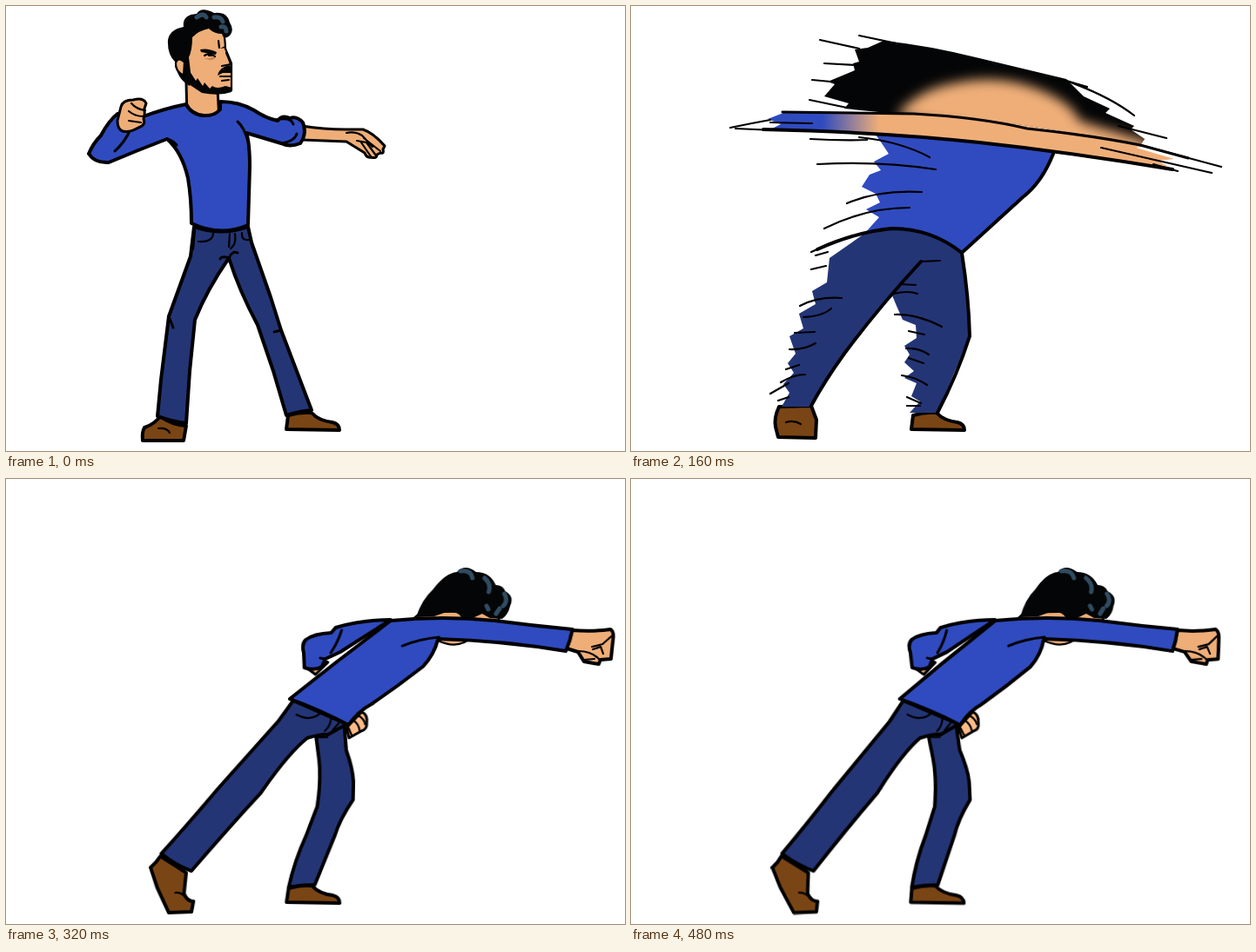
An HTML page that plays this animation: 711x512 px, repeating every 0.56 s.

```html
<!DOCTYPE html>
<html lang="en">
<head>
<meta charset="utf-8">
<title>Punch</title>
<style>
  html, body { margin: 0; width: 100%; height: 100%; overflow: hidden; background: #fff; }
  svg { display: block; width: 100vw; height: 100vh; }
  path { stroke: #000; stroke-width: 4; stroke-linejoin: round; stroke-linecap: round; fill: none; }
  .shirt { fill: #304bbf; }
  .jean { fill: #243576; }
  .skin { fill: #efae78; }
  .palm { fill: #fdbc87; }
  .shoe { fill: #7a4514; }
  .hair { fill: #040506; }
  .shade { fill: #c98652; }
  .sleeve { fill: url(#sleeve); }
  .shine { stroke: #2f4b61; stroke-width: 5; }
  .thin { stroke-width: 2.2; }
  .mid { stroke-width: 3; }
  .bare { stroke: none; }

  /* Poses lean by skewing about the ground line. */
  .pose { transform-origin: 0 500px; animation: .56s step-end infinite; }
  #windup { animation-name: windup; }
  #swing { animation-name: swing; }
  #punch { animation-name: punch; }
  @keyframes windup {
    0% { visibility: visible; transform: none; }
    14.2857% { visibility: visible; transform: skewX(1.75deg); }
    28.5714%, 100% { visibility: hidden; transform: none; }
  }
  @keyframes swing {
    0% { visibility: hidden; }
    28.5714% { visibility: visible; }
    42.8571%, 100% { visibility: hidden; }
  }
  @keyframes punch {
    0% { visibility: hidden; transform: none; }
    42.8571% { visibility: visible; transform: none; }
    57.1428% { visibility: visible; transform: skewX(-1.15deg); }
    71.4286% { visibility: visible; transform: skewX(1.66deg); }
    85.7143%, 100% { visibility: visible; transform: skewX(2.86deg); }
  }
</style>
</head>
<body>
<svg viewBox="0 0 711 512">
  <defs>
    <path id="shoe" class="shoe" d="M324 471L322 487L383 488Q383 481 375 479Q359 477 351 468Q338 467 324 471Z"/>
    <path id="mane" class="hair bare" d="M290 40Q340 45 400 60L500 84L520 104L550 118L545 123L578 138L574 142L590 153L585 160Q490 142 400 130L325 126L245 118L250 112L222 104L234 90L226 87L257 74L255 66L262 64L257 50L272 48Z"/>
    <clipPath id="maneClip"><use href="#mane"/></clipPath>
    <filter id="soft" x="-20%" y="-40%" width="140%" height="180%"><feGaussianBlur stdDeviation="7"/></filter>
    <linearGradient id="sleeve" gradientUnits="userSpaceOnUse" x1="220" y1="0" x2="285" y2="0">
      <stop stop-color="#304bbf"/><stop offset="1" stop-color="#efae78"/>
    </linearGradient>
  </defs>

  <g id="windup" class="pose">
    <!-- legs -->
    <path class="shoe" d="M177 472Q171 481 159 485Q156 490 157 500L204 500L207 483Q190 482 177 472Z"/>
    <path class="thin" d="M175 486Q185 485 188 491"/>
    <use href="#shoe"/>
    <path class="jean" d="M216 254Q245 265 278 254L282 272L304 335L316 373L351 465Q338 466 322 471L307 420L289 367Q268 328 256 290Q231 326 217 361L211 420L207 480Q193 479 174 472L178 430L187 357L212 288Z"/>
    <path class="mid" d="M187 357L192 370M316 373L308 375M256 290Q260 281 266 284M256 290Q248 287 246 291"/>
    <path class="thin" d="M238 261Q238 272 221 271M257 262L256 277M263 262Q265 274 258 279M271 261Q270 270 279 269M217 258L215 280"/>
    <!-- arms and torso -->
    <path class="skin mid" d="M207 88L208 132L245 132L243 95Z"/>
    <path class="skin mid" d="M340 138Q365 142 390 142L410 142Q422 146 435 161L433 165Q435 170 430 169L426 171Q426 176 419 174Q414 175 412 169L391 156L340 154Z"/>
    <path class="thin" d="M391 146Q401 144 409 149L421 162M411 152L430 167M403 155L414 157L425 172M408 157L419 173"/>
    <path class="shirt" d="M207 113Q182 118 158 127L128 124Q118 132 109 149Q100 158 95 170Q102 181 118 180Q151 166 185 153Q202 168 209 198Q213 222 213 250Q246 266 278 252Q279 215 280 185Q280 158 276 146L316 158Q326 163 338 158Q346 147 341 134Q334 126 326 129Q317 125 312 132Q298 129 285 120Q268 110 246 110L246 119Q239 127 227 126Q213 125 207 113Z"/>
    <path class="mid" d="M266 133Q274 140 278 156M185 153Q191 154 196 160M142 144Q136 157 125 167M310 131Q327 127 330 136M317 158Q332 155 334 147"/>
    <path class="skin mid" d="M132 116Q134 108 146 108Q158 105 161 112L159 118Q160 124 158 130Q161 137 152 140Q142 146 134 144Q128 142 128 132Z"/>
    <path class="thin" d="M144 112Q150 119 160 120M141 121Q148 127 158 127M141 132L155 134"/>
    <!-- head -->
    <path class="skin thin" d="M207 24L249 24Q252 40 252 49L259 66L259 97Q245 102 230 98L212 86L205 60Z"/>
    <path class="hair bare" d="M211 92Q196 84 194 64Q185 55 186 39Q188 27 204 24Q202 10 219 9Q224 0 239 8Q254 6 257 19Q263 28 256 35Q250 39 248 32Q239 32 233 26Q222 28 214 36Q214 51 210 59L212 76Z"/>
    <path class="shine" d="M219 13Q227 7 230 13M239 13Q247 12 249 18M247 24Q253 23 253 29"/>
    <path class="hair bare" d="M207 74L210 90L225 100Q245 104 259 99L260 94L252 92Q242 96 237 92L234 95L228 88L226 92L220 83L218 86L211 75Z"/>
    <path class="skin thin" d="M205 65Q198 58 195 65Q194 75 204 80Z"/>
    <path class="hair bare" d="M243 80Q245 70 257 68L260 72L259 77L249 77ZM223 50Q232 48 242 53L241 56L224 53ZM246 49L253 45L253 48Z"/>
    <path class="shade bare" d="M226 59Q234 65 241 60L238 58Q232 62 226 59Z"/>
    <path class="thin" d="M228 57Q234 53 240 58M233 57L236 57M244 40L245 48M253 54Q257 63 258 67L248 69M246 81L258 81M248 86L256 85"/>
  </g>

  <g id="swing" class="pose">
    <path class="shoe" d="M170 461Q164 474 166 484L169 496L212 497L213 476L207 460Z"/>
    <path class="thin" d="M178 479Q187 476 195 481"/>
    <use href="#shoe"/>
    <path class="jean bare" d="M268 262Q300 252 335 260Q360 268 381 285L388 340L389 380L352 468L320 468L332 455L322 449L328 434L314 428L325 420L314 410L320 401L314 391L328 382L327 367L312 361L305 345L300 333Q270 367 245 400L207 461L173 461L182 445L175 435L187 422L180 411L189 400L182 380L198 371L193 354L212 343L208 328L225 318L228 290Z"/>
    <path class="shirt bare" d="M272 135L485 164Q473 203 450 220L382 284Q350 259 310 256Q290 255 268 262L285 243L270 234L286 226L281 216L265 208L274 194L287 189L279 179L296 170L288 158Z"/>
    <path d="M214 280Q258 260 300 256Q345 256 380 284M485 170Q472 203 450 220L381 283M380 284Q388 335 389 380Q375 424 352 468M333 294Q286 345 245 400Q222 432 207 460"/>
    <path class="thin" d="M333 294L355 293"/>
    <!-- blurred head and arm -->
    <use href="#mane"/>
    <g clip-path="url(#maneClip)">
      <path class="skin bare" filter="url(#soft)" d="M305 126Q330 95 375 88Q430 77 480 101Q508 114 515 132L600 158L580 175Z"/>
    </g>
    <path class="sleeve bare" d="M157 130L180 121L325 124Q405 128 500 146Q555 153 590 161L580 163L624 176L605 178L624 189Q490 169 400 157Q290 145 160 142L172 136Z"/>
    <path class="mid" d="M174 122L325 124Q400 128 455 141Q530 149 585 160L640 175"/>
    <path d="M152 142Q290 145 400 157Q510 169 622 188"/>
    <!-- speed lines -->
    <path class="thin" d="M262 34L305 43M217 39L262 49M222 66L260 68M208 85L240 88M205 108L248 117M490 83L524 93M500 86Q550 104 578 126M560 138L615 152M585 160L678 185M540 163L667 192M600 182L628 190M114 140Q138 135 160 131M120 141L165 143M160 134L208 135"/>
    <path class="thin" d="M206 153Q240 155 271 154M262 151Q310 156 343 174M214 182Q285 178 350 188M248 227Q285 211 334 214M222 256Q270 232 320 232M207 283L232 272M212 287L226 283M207 303L224 299M194 345Q215 334 242 336M198 358Q220 357 230 348M188 376L211 375M182 395Q198 396 212 388M178 418L193 413M172 433Q187 424 200 424M160 446L181 434M169 454L181 450M309 320L327 321M302 331Q318 327 329 331M303 355Q328 354 357 369M319 374L337 378M316 394Q330 393 342 401M319 405L336 411M311 425Q327 427 340 436M317 450L333 457M317 460L332 460"/>
  </g>

  <g id="punch" class="pose">
    <!-- legs -->
    <path class="shoe" d="M176 434Q172 441 165 447L173 470L187 499L213 498L215 486Q208 486 204 477L206 453Z"/>
    <path class="thin" d="M194 476Q202 475 208 484"/>
    <use href="#shoe"/>
    <path class="jean" d="M352 296L384 280L387 312Q395 333 396 348L396 369Q381 392 376 410L354 467Q338 467 324 470Q330 440 343 410L355 377Q359 345 356 323Z"/>
    <path class="jean" d="M325 255L308 279L240 357Q208 396 177 431Q193 444 212 451Q252 403 290 361Q321 315 342 298Q359 293 366 294L387 282Z"/>
    <path class="thin" d="M329 271Q347 281 360 266M369 273Q369 284 362 290M382 276L371 289M352 297L365 297"/>
    <path class="palm mid" d="M387 286L404 268Q411 271 410 280Q411 288 404 290L390 298Z"/>
    <path class="thin" d="M395 278Q401 282 402 290M400 272Q407 276 408 282M389 286L393 295"/>
    <!-- head -->
    <path class="skin thin" d="M458 163L470 153L495 153L555 152L560 163L520 188Q507 194 490 186Z"/>
    <path class="hair bare" d="M464 159Q471 138 483 127Q497 108 510 107Q519 97 532 107Q548 107 555 122Q563 122 566 129Q577 135 572 146Q570 156 563 161L549 160L540 155L527 161L516 159Q513 152 499 153L485 158Z"/>
    <path class="shine" d="M514 106Q526 104 528 114M542 114Q550 121 547 130M565 132Q570 140 564 146M545 146L547 150M560 149L556 155"/>
    <!-- arms and torso -->
    <path class="skin mid" d="M342 219L356 208L364 211L350 225Z"/>
    <path class="shirt" d="M435 162Q402 162 372 171L367 177Q347 178 338 185Q333 190 336 200L337 217Q348 221 357 216L361 207L378 199Z"/>
    <path class="mid" d="M379 174Q375 188 367 200M360 207L355 206"/>
    <path class="skin" d="M644 174Q665 176 688 173Q692 176 691 184L689 207L677 208L675 213L658 210L651 199L638 195Z"/>
    <path class="thin" d="M690 180L679 190L667 193M668 196L677 193L680 201M652 198Q666 198 675 207M658 208L670 207"/>
    <path class="shirt" d="M435 163Q402 189 372 212L321 253Q357 266 389 283Q400 267 415 259Q444 239 473 216Q486 202 490 184Q565 186 637 198Q642 186 644 173Q600 169 555 163Q495 157 435 163Z"/>
    <path class="mid" d="M449 192Q469 184 491 182"/>
  </g>
</svg>
</body>
</html>
```
